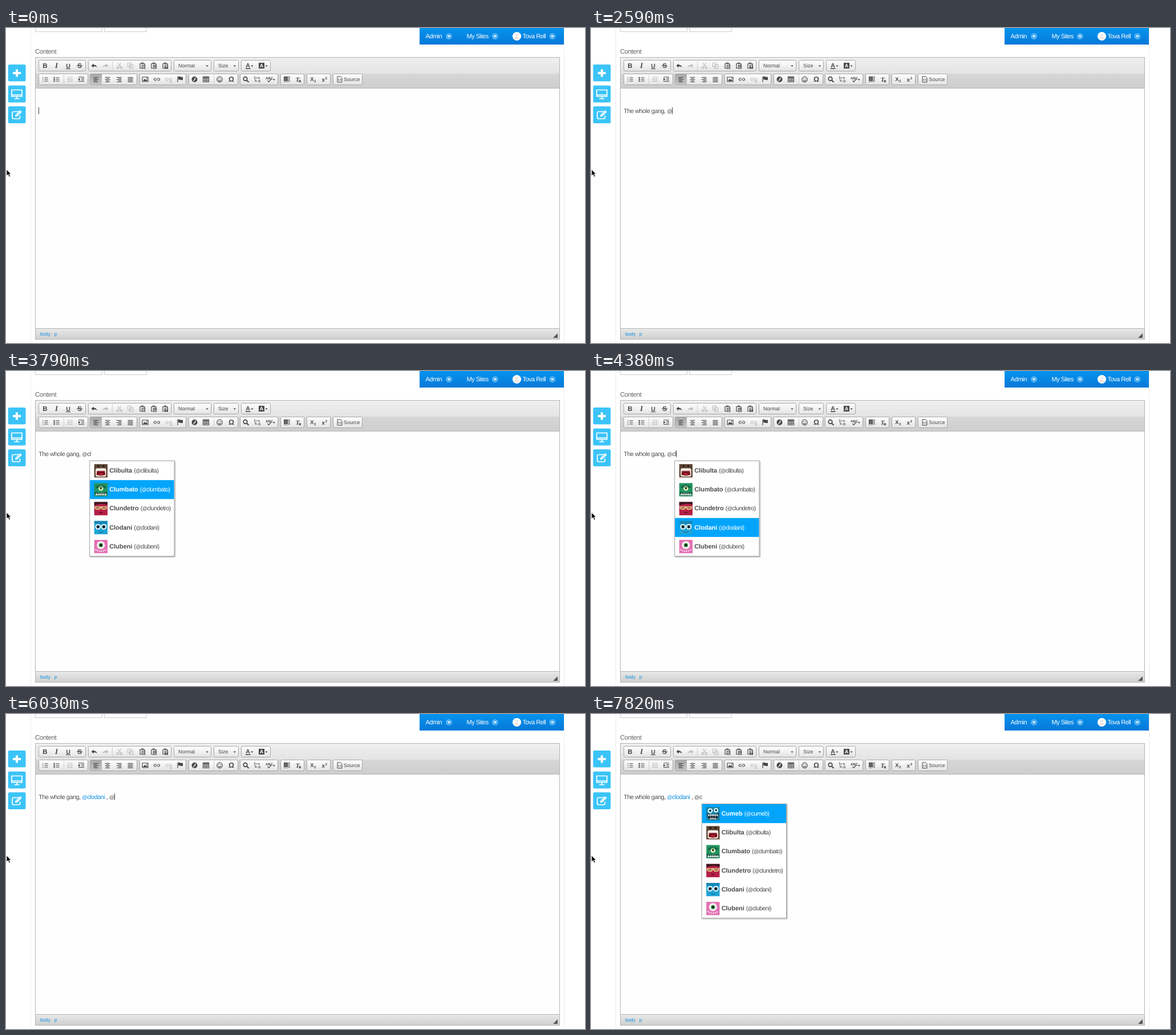
An HTML page for the animation above (8000 ms loop, 1015 px wide and 552 px high).

```html
<!DOCTYPE html>
<html lang="en">
<head>
<meta charset="utf-8">
<title>Mention autocomplete</title>
<style>
  html, body { margin: 0; width: 100%; height: 100%; overflow: hidden; background: #fff; }
  svg { display: block; width: 100vw; height: 100vh; }
  text { font-family: "Liberation Sans", Arial, sans-serif; text-rendering: geometricPrecision; white-space: pre; }
  .body { font-size: 10.8px; letter-spacing: -.43px; fill: #505050; }
  .at { font-size: 9.2px; }
  .link { fill: #1190e2; }
  .menu { font-size: 11px; letter-spacing: -.5px; fill: #fff; }
  .label { font-size: 11.5px; letter-spacing: -.45px; fill: #666; }
  .tool { font-size: 9px; fill: #474747; }
  .path { font-size: 8.4px; letter-spacing: -.1px; fill: #0a8fe0; }
  .name { font-size: 11px; font-weight: 700; letter-spacing: -.05px; }
  .handle { font-size: 10.6px; letter-spacing: -.58px; }
  .row { fill: #4c4c4c; }
  .row.on { fill: #fff; }
  .icon { fill: none; stroke: #474747; stroke-width: 1.2; }
  .icon .f { fill: #474747; stroke: none; }
  .icon text { fill: #474747; stroke: none; text-anchor: middle; }
  .off { opacity: .3; }
</style>
</head>
<body>
<svg viewBox="0 0 1015 552" preserveAspectRatio="none">
  <defs>
    <linearGradient id="head" x2="0" y2="1"><stop stop-color="#0594ee"/><stop offset="1" stop-color="#0878d8"/></linearGradient>
    <linearGradient id="bar" x2="0" y2="1">
      <stop stop-color="#efefef"/><stop offset=".52" stop-color="#e4e4e4"/>
      <stop offset=".54" stop-color="#d6d6d6"/><stop offset="1" stop-color="#cecece"/>
    </linearGradient>
    <linearGradient id="foot" x2="0" y2="1"><stop stop-color="#e8e8e8"/><stop offset="1" stop-color="#d0d0d0"/></linearGradient>
    <linearGradient id="btn" x2="0" y2="1"><stop stop-color="#fff"/><stop offset="1" stop-color="#e3e3e3"/></linearGradient>
    <linearGradient id="press" x2="0" y2="1"><stop stop-color="#a9a9a9"/><stop offset="1" stop-color="#c4c4c4"/></linearGradient>
    <filter id="shade" x="-5%" y="-5%" width="112%" height="112%">
      <feDropShadow dx="1" dy="1" stdDeviation=".8" flood-color="#000" flood-opacity=".4"/>
    </filter>
  </defs>
  <g id="page"></g>
  <text id="line" class="body" x="57.3" y="149"></text>
  <rect id="caret" y="139" width="1" height="12" fill="#444"/>
  <g id="popup"></g>
  <path d="M1 248v11l2.6-2.3 1.9 4.3 2-.9-1.9-4.1h3.2z" fill="#000" stroke="#fff" stroke-width=".8"/>
</svg>
<script>
const $ = id => document.getElementById(id);
const rect = (x, y, w, h, fill, more = '') => `<rect x="${x}" y="${y}" width="${w}" height="${h}" fill="${fill}" ${more}/>`;
const text = (x, y, cls, s, more = '') => `<text x="${x}" y="${y}" class="${cls}" ${more}>${s}</text>`;
const path = (d, fill, more = '') => `<path d="${d}" fill="${fill}" ${more}/>`;
const disc = (x, y, r, fill) => `<circle cx="${x}" cy="${y}" r="${r}" fill="${fill}"/>`;
const solid = d => `<path class="f" d="${d}"/>`;
const line = (d, more = '') => `<path d="${d}" ${more}/>`;
const glyph = (s, size, more = '', x = 0, y = 4) => `<text x="${x}" y="${y}" font-size="${size}" ${more}>${s}</text>`;
const icon = (x, y, art, off) => `<g class="icon${off ? ' off' : ''}" transform="translate(${x} ${y})">${art}</g>`;
const arrow = (x, y) => path(`M${x - 2.2} ${y - 1}h4.4l-2.2 2.6z`, '#474747');

// ---- toolbar icons, drawn around their centre
const undo = solid('M-5 0l4-3.6v2.2C2-1.4 4.500 0 5 3.400 3.500 1.600 1.500 1.200-1 1.400V3.600z');
const flip = art => `<g transform="scale(-1 1)">${art}</g>`;
const clip = line('M-1.500 4.500H-4V-3.500H4V-1M-1.500-3.500V-5H1.500v1.500') + line('M-.5-1H4.500V5H-.5z');
const bars = (widths, shift) => line(widths.map((w, i) => `M${shift(w)} ${i * 2 - 3.5}h${w}`).join(''));
const listing = mark => line('M-1-3h6M-1 0h6M-1 3h6') + mark;
const dent = head => line('M-5-4H5M0-1.500H5M0 1H5M-5 3.500H5') + solid(head);
const chain = line('M-1-2h-2a2 2 0 0 0 0 4h2M1-2h2a2 2 0 0 1 0 4H1M-2 0h4');
const serif = 'style="font-family:\'Liberation Serif\',serif"';

const icons = [
  [68.5, 66, glyph('B', 11.5, 'font-weight="700"')],
  [88.5, 66, glyph('I', 13, serif + ' font-style="italic" font-weight="700"')],
  [109, 66, glyph('U', 10.5, 'font-weight="700"', 0, 3.5) + line('M-4 5.500h8')],
  [129, 66, glyph('S', 11.5, 'font-weight="700"') + line('M-5 0h10')],
  [154.5, 66, undo],
  [174.5, 66, flip(undo), 1],
  [199, 66, line('M-3-5L2 2M3-5L-2 2') + '<circle cx="-3" cy="3.500" r="1.700"/><circle cx="3" cy="3.500" r="1.700"/>', 1],
  [218, 66, line('M-4.500-5H1V2H-4.500zM-1-2H4.500V5H-1z'), 1],
  [239, 66, clip + line('M1 1h2.500M1 3h2.500')],
  [259, 66, clip + line('M.5.800h3.500M2.200.800V4')],
  [279, 66, clip + line('M.500 2h3v2h-3z')],
  [68.5, 90, listing(glyph('1', 4, '', -3.8, -1.8) + glyph('2', 4, '', -3.8, 1.4) + glyph('3', 4, '', -3.8, 4.6))],
  [88.5, 90, listing([-3, 0, 3].map(y => solid(`M-5 ${y - 1.1}h2.200v2.200h-2.200z`)).join(''))],
  [112, 90, dent('M-5 0l3.500-2.500v5z'), 1],
  [132, 90, dent('M-1.500 0l-3.500-2.500v5z')],
  [158, 90, bars([9, 6, 9, 6, 8], () => -4.5)],
  [178, 90, bars([9, 5, 9, 5, 8], w => -w / 2)],
  [198, 90, bars([9, 6, 9, 6, 8], w => 4.5 - w)],
  [218, 90, bars([9, 9, 9, 9, 9], () => -4.5)],
  [244, 90, line('M-5-4H5V4H-5z') + solid('M-4 3l3-4 2 2 1.500-1.500L4 3z') + solid('M2-3h1.500v1.500H2z')],
  [264.5, 90, chain],
  [285, 90, chain + line('M2 4l3 2M4 2l2 3'), 1],
  [305, 90, line('M-4-5V5') + solid('M-3-5C-1-6 1-3 5-4.500V1C1 2-1-.5-3 .5z')],
  [330.5, 90, '<circle class="f" r="5"/>' + line('M2.500-3C0-3 0 3-2.500 3M-.5 0h2.500', 'stroke="#fff"')],
  [350.5, 90, line('M-5-4.500H5V4.500H-5zM-5-1.500H5M-5 1.500H5M-1.700-4V4M1.700-4V4') + solid('M-5-5H5v2H-5z')],
  [374.5, 90, '<circle r="4.700"/>' + line('M-2.500 1.200Q0 4 2.500 1.200M-1.700-2v1.500M1.700-2v1.500')],
  [395, 90, glyph('Ω', 12.5, 'font-weight="700"', 0, 4.2)],
  [420.5, 90, '<circle cx="-1" cy="-1" r="3.300" stroke-width="1.700"/>' + line('M1.500 1.500L5 5', 'stroke-width="2"')],
  [440.5, 90, glyph('b', 8, '', -3.5, 0) + glyph('a', 8, '', 3.5, 5) + line('M0-3h3.500v2M0 3h-3.500v-2')],
  [461.5, 90, glyph('ABC', 6, 'font-weight="700"', 0, -.5) + line('M-3 2l2 2.500L4-1')],
  [492, 90, solid('M-5-5H2V3H-5z') + line('M3.500-5V4M5-5V4M-5 4.500H2', 'stroke-dasharray="1.500 1"') + line('M-4-3h5M-4-1h5M-4 1h5', 'stroke="#aaa" stroke-width=".7"')],
  [512, 90, glyph('T', 11, serif + ' font-style="italic" font-weight="700"', -1) + line('M1.500 1.500l3.500 3.500M5 1.500L1.500 5')],
  [538, 90, glyph('X', 9.5, 'font-weight="700"', -1.7, 3) + glyph('2', 6, 'font-weight="700"', 3.7, 5)],
  [558, 90, glyph('x', 10, 'font-weight="700"', -1.7, 3.5) + glyph('2', 6, 'font-weight="700"', 3.3, -.5)],
  [585, 90, line('M-4-5H1.500L4-2.500V5H-4zM-.8-1L-2.300.800-.8 2.500M1-1L2.500.800 1 2.500', 'stroke-width="1"')],
  [425, 66, glyph('A', 10.5, 'font-weight="700"', -1, 3) + line('M-5 5H3.500', 'stroke-width="1.600"')],
  [449, 66, solid('M-6-5H4V5H-6z') + '<text x="-1" y="3.300" font-size="9" font-weight="700" style="fill:#fff">A</text>']
];

const groups = [
  [56.5, [[57.5, 139.5], [144.5, 289.5], [294.5, 359.5], [364.5, 407.5], [412.5, 463.5]]],
  [80.5, [[57.5, 143.5], [147.5, 229.5], [234.5, 315.5], [320.5, 406.5], [410.5, 476.5], [481.5, 522.5], [527.5, 568.5], [573.5, 624.5]]]
];

const chevron = x => disc(x, 14.5, 5.6, '#4fb0f2') + path(`M${x - 2.8} 13.200h5.600l-2.800 3.300z`, '#fff');

function drawPage() {
  let s = rect(43, 0, 1, 552, '#ececec') + rect(978, 0, 1, 552, '#ececec');
  s += path('M51.500 0V6.500H168.500V0M172.500 0V6.500H246.500V0', '#fff', 'stroke="#ccc"');

  s += rect(725, 0, 253, 29, 'url(#head)');
  s += text(735.5, 18, 'menu', 'Admin') + chevron(776.5) + text(807.5, 18, 'menu', 'My Sites') + chevron(857.3);
  s += disc(895.5, 14.5, 7.6, '#fff') + disc(895.5, 12.5, 2.4, '#f0e4de') + path('M891 19.500q0-4 4.500-4t4.500 4z', '#f0e4de');
  s += text(905.5, 18, 'menu', 'Tova Rell') + chevron(957.8);

  s += text(51, 45, 'label', 'Content');
  s += rect(51.5, 51.5, 919, 494, '#fefefe', 'stroke="#b4b4b4"');
  s += rect(52, 52, 918, 53, 'url(#bar)') + rect(52, 105, 918, 1, '#b4b4b4');
  s += rect(52, 527, 918, 18, 'url(#foot)') + rect(52, 526, 918, 1, '#b4b4b4');
  s += text(60, 539, 'path', 'body') + text(84.7, 539, 'path', 'p') + path('M967 535v8h-8z', '#555');

  for (const [y, spans] of groups)
    for (const [a, b] of spans)
      s += rect(a, y, b - a, 19, 'url(#btn)', 'rx="2" stroke="#a8a8a8"');
  s += rect(148, 81, 20, 18, 'url(#press)');
  for (const [x, y] of [[186, 58], [101, 82], [364, 82]]) s += rect(x, y, 1, 16, '#cfcfcf');
  s += icons.map(i => icon(...i)).join('');
  s += text(302, 69.3, 'tool', 'Normal') + text(372, 69.3, 'tool', 'Size') + text(592, 93.2, 'tool', 'Source');
  for (const [x, y] of [[352.5, 66.5], [400.8, 66.5], [431.3, 66.5], [456.6, 66.5], [469.8, 90.5]]) s += arrow(x, y);

  for (const y of [64, 100.8, 137.3]) s += rect(3.7, y, 30.8, 29.6, '#3bc4f8', 'rx="2.500"');
  s += path('M17 72.500h4v4.600h5v3.800h-5v4.600h-4v-4.600h-5v-3.800h5z', '#fff');
  s += path('M10 108.500h18v11.500h-18zM10 117.300h18M19 120v4M14.500 124h9', 'none', 'stroke="#fff" stroke-width="1.700" stroke-linejoin="round"');
  s += path('M23 146.500H13.500q-2.500 0-2.500 2.500v7.500q0 2.500 2.500 2.500h8.500q2.500 0 2.500-2.500v-3', 'none', 'stroke="#fff" stroke-width="1.700"');
  s += path('M16 155.500l.600-3.600 8.200-8 3 3-8.200 8z', '#fff') + path('M18 153l7-6.800', 'none', 'stroke="#3bc4f8" stroke-width=".8"');
  $('page').innerHTML = s;
}

// ---- monster portraits on a 24 by 24 tile
const eye = (x, y, r, iris) => disc(x, y, r, '#fff') + disc(x, y, r * .62, iris) + disc(x, y, r * .34, '#111');
const teeth = (x, y, n, w, h) => path(Array.from({ length: n }, (_, i) => `M${x + i * w} ${y}h${w}l${-w / 2} ${h}z`).join(''), '#fff');
const faces = {
  grin: rect(0, 0, 24, 24, '#1d7f9e') + eye(7, 6.5, 4.5, '#46c4ea') + eye(17.5, 5.5, 4, '#46c4ea') +
    path('M1 12q11 5 22-1-1 12-11 12T1 12z', '#15232c') + teeth(2.5, 13.5, 6, 3.2, 4) + teeth(6, 22, 4, 3, -4),
  roar: rect(0, 0, 24, 24, '#5d4433') + disc(7.5, 3.5, 2, '#2a1c16') + disc(16.5, 3.5, 2, '#2a1c16') +
    rect(2.5, 7.5, 19, 15, '#f6efe6', 'rx="3"') + path('M5 11.500h14l1 8q-8 3-16 0z', '#7d0f1c') +
    path('M7 19q5-5 10 0z', '#c22f3c') + teeth(5, 11, 5, 2.8, 2.5),
  ogre: rect(0, 0, 24, 24, '#23945f') + path('M3 6q9-6 18 0v3H3z', '#166a45') + eye(12, 9.5, 4.2, '#9ac83c') +
    path('M7 8q5-4 10 0l-5-1z', '#0f5136') + path('M1 16q11 3 22 0v6q-11 2-22 0z', '#0f4632') + teeth(2, 22, 6, 3.4, -5),
  shades: rect(0, 0, 24, 24, '#b51f45') + path('M0 0h24v5q-12-4-24 1z', '#3a1720') +
    path('M1 7.500h22v4q-2 4-9 2l-2-3-2 3q-7 2-9-2z', '#e5bd85') + path('M3 9.500h7M14 9.500h7M3 11.500h6M15 11.500h6', 'none', 'stroke="#7b3a33"') +
    path('M8 19q4-2 8 0-4 2.500-8 0z', '#6f0f2c'),
  owl: rect(0, 0, 24, 24, '#1fa4d6') + path('M0 0h24v4q-12 4-24 0z', '#1688b7') + eye(6.8, 10.5, 5, '#235a70') + eye(17.2, 10.5, 5, '#235a70') +
    path('M8 19.500q4 2 8 0', 'none', 'stroke="#0d668d" stroke-width="1.300"'),
  cyclops: rect(0, 0, 24, 24, '#e270b3') + disc(12, 9.5, 7.8, '#f5b3d8') + eye(12, 9.5, 6.4, '#4fa45c') +
    path('M2 17q10 7 20 0', 'none', 'stroke="#fff" stroke-width="2" stroke-dasharray="2 1.500"')
};
const users = [['Cumeb', 'grin'], ['Clibulta', 'roar'], ['Clumbato', 'ogre'], ['Clundetro', 'shades'], ['Clodani', 'owl'], ['Clubeni', 'cyclops']];
const ROW = 33.2;

function popup(query, x, sel) {
  const found = users.filter(([n]) => n.toLowerCase().startsWith(query));
  let s = rect(0, 0, 148.3, found.length * ROW + 1, '#fff', 'stroke="#a6a6a6" filter="url(#shade)"');
  found.forEach(([name, face], i) => {
    const y = .5 + i * ROW;
    if (i === sel) s += rect(.5, y, 147.3, ROW, '#03a5fb');
    s += `<g transform="translate(8 ${y + 5.2}) scale(.97)">${faces[face]}</g>`;
    s += `<text x="34.500" y="${y + 20}" class="row${i === sel ? ' on' : ''}"><tspan class="name">${name}</tspan>` +
      `<tspan class="handle" dx="3">(<tspan class="at">@</tspan>${name.toLowerCase()})</tspan></text>`;
  });
  return `<g transform="translate(${x} 157.500)">${s}</g>`;
}

// ---- timeline: start, text, caret shown, selected row
const A = 'The whole ', B = A + 'gang, ', C = B + '@clodani ';
const steps = [
  [0, '', 1], [140, 'T', 1], [290, 'The', 1], [440, 'The ', 1], [590, 'The w', 1], [740, 'The who', 1], [950, 'The whole', 1], [1100, A, 1],
  [1250, A + 'g', 1], [1400, A + 'ga', 1], [1550, A + 'gang', 1], [2000, B, 1],
  [2440, B, 0], [2590, B + '@', 1], [2890, B + '@c', 1, 0], [3340, B + '@cl', 1, 0],
  [3790, B + '@cl', 0, 1], [4090, B + '@cl', 0, 2], [4240, B + '@cl', 1, 2], [4380, B + '@cl', 1, 3],
  [4680, C, 1], [5130, C, 0], [5280, C + ',', 1], [5430, C + ', ', 1], [5880, C + ', ', 0], [6030, C + ', @', 1],
  [6330, C + ', @c', 1, 0], [6780, C + ', @c', 0, 0], [7220, C + ', @c', 1, 0], [7820, C + ', @c', 0, 0]
];
const LOOP = 8000;
let shown = null;

function show(step) {
  const [, typed, caret, sel] = step;
  const at = '<tspan class="at">@</tspan>';
  $('line').innerHTML = typed.replace(/@clodani/, '<tspan class="link">$&</tspan>').replace(/@/g, at);
  const width = typed ? $('line').getComputedTextLength() : 0;
  $('caret').setAttribute('x', Math.round(57.1 + width));
  $('caret').setAttribute('visibility', caret ? 'visible' : 'hidden');
  const open = typed.match(/@(c\w*)$/);
  $('popup').innerHTML = open ? popup(open[1], typed.startsWith(C) ? 194.2 : 146.7, sel) : '';
}

function tick() {
  const now = performance.now() % LOOP;
  const step = steps.findLast(s => s[0] <= now);
  if (step !== shown) show(shown = step);
  requestAnimationFrame(tick);
}

drawPage();
tick();
</script>
</body>
</html>
```
